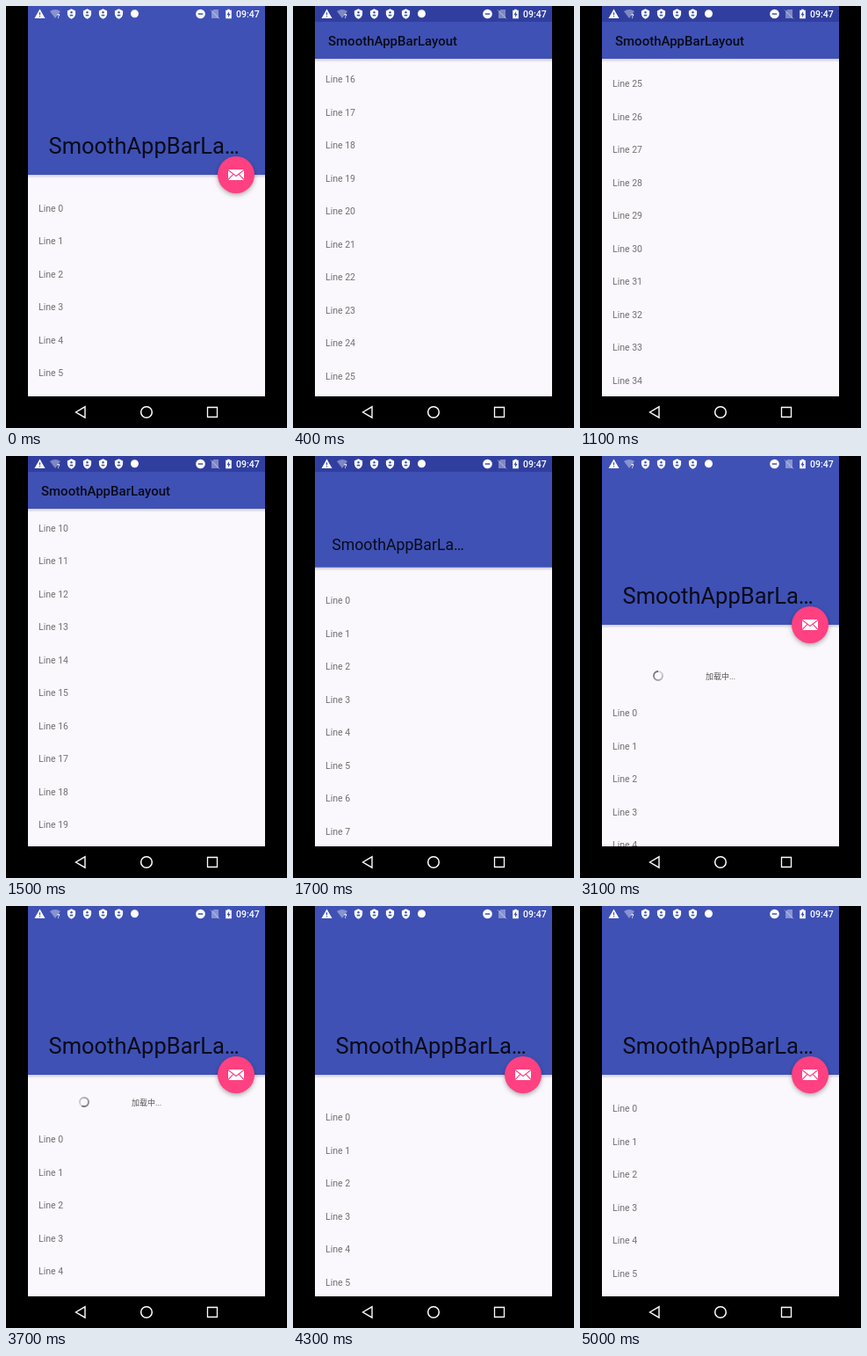
Recreate the animation shown at these times as an HTML page with a canvas. Size 320 px wide and 480 px high, loop 5100 ms.

```html
<!DOCTYPE html>
<html lang="en">
<head>
<meta charset="utf-8">
<title>Collapsing app bar</title>
<style>
  html, body { margin: 0; width: 100%; height: 100%; overflow: hidden; background: #000; }
  canvas { display: block; }
</style>
</head>
<body>
<canvas id="stage" width="320" height="480"></canvas>
<script>
const ctx = document.getElementById('stage').getContext('2d');
const LOOP = 5100, STEP = 100;
const LEFT = 25, WIDTH = 270, BOTTOM = 444;
const BAR_MAX = 192, BAR_MIN = 60, RANGE = BAR_MAX - BAR_MIN;
const ROW = 37.5, LIST_TOP = 211, SCROLL_END = 1079, HEADER = 62.5;
const PRIMARY = '#3f51b5', ACCENT = '#ff4081', PAPER = '#faf8fc';

const lerp = (a, b, k) => a + (b - a) * k;
const progress = (t, start, length) => Math.min(1, Math.max(0, (t - start) / length));
const smooth = k => k * k * (3 - 2 * k);
const easeOut = k => 1 - (1 - k) ** 2;

function rect(x, y, w, h, color) {
  ctx.fillStyle = color;
  ctx.fillRect(x, y, w, h);
}

function disc(x, y, r, color) {
  ctx.fillStyle = color;
  ctx.beginPath();
  ctx.arc(x, y, r, 0, 7);
  ctx.fill();
}

function text(str, x, y, size, color, weight = 400, family = 'Roboto, sans-serif') {
  ctx.font = `${weight} ${size}px ${family}`;
  ctx.fillStyle = color;
  ctx.fillText(str, x, y);
}

function fillPath(d, color) {
  ctx.fillStyle = color;
  ctx.fill(new Path2D(d));
}

function strokePath(d, color, width) {
  ctx.strokeStyle = color;
  ctx.lineWidth = width;
  ctx.stroke(new Path2D(d));
}

function at(x, y, draw) {
  ctx.save();
  ctx.translate(x, y);
  draw();
  ctx.restore();
}

function clipped(x, y, w, h, draw) {
  ctx.save();
  ctx.beginPath();
  ctx.rect(x, y, w, h);
  ctx.clip();
  draw();
  ctx.restore();
}

function scrollAt(t) {
  return SCROLL_END * (smooth(progress(t, 0, 634)) - smooth(progress(t, 1200, 588)));
}

function pullAt(t) {
  return t < 2900 ? 0 : HEADER * (1 - progress(t, 3324, 2180)) ** 3;
}

function drawRefreshHeader(t, pull) {
  const y = LIST_TOP + pull - 23.5;
  clipped(LEFT, LIST_TOP, WIDTH, pull, () => {
    const ring = ctx.createConicGradient((t - 3100) / 1000 * Math.PI * 2 - 1.6, 89, y);
    ring.addColorStop(0, '#dddbdf');
    ring.addColorStop(1, '#6c6b6e');
    ctx.strokeStyle = ring;
    ctx.lineWidth = 2;
    ctx.beginPath();
    ctx.arc(89, y, 5, 0, 7);
    ctx.stroke();
    text('加载中...', 143, y + 3.6, 9, '#555', 400, 'Roboto, "Noto Sans CJK SC", "Noto Sans CJK", sans-serif');
  });
}

function drawList(t, scroll, pull) {
  rect(LEFT, 0, WIDTH, BOTTOM, PAPER);
  if (pull) drawRefreshHeader(t, pull);
  const base = 233.7 - scroll + pull;
  const first = Math.max(0, Math.floor((BAR_MIN - base) / ROW));
  for (let i = first; base + i * ROW < BOTTOM + 12; i++) {
    text('Line ' + i, 37, base + i * ROW, 10.5, '#717072');
  }
}

function drawBar(bottom) {
  const shadow = ctx.createLinearGradient(0, bottom, 0, bottom + 4);
  shadow.addColorStop(0, 'rgba(40,20,60,.2)');
  shadow.addColorStop(1, 'rgba(40,20,60,0)');
  rect(LEFT, bottom, WIDTH, 4, shadow);
  rect(LEFT, 0, WIDTH, bottom, PRIMARY);

  const k = (BAR_MAX - bottom) / RANGE;
  const closed = k === 1;
  text(closed ? 'SmoothAppBarLayout' : 'SmoothAppBarLa…', lerp(48.5, 40, k), lerp(168, 44.5, k),
    lerp(25.5, 15, easeOut(k)), '#090b18', closed ? 500 : 400);
}

function drawFab(y, scale) {
  if (scale <= 0) return;
  at(262, y, () => {
    ctx.scale(scale, scale);
    ctx.shadowColor = 'rgba(0,0,0,.32)';
    ctx.shadowBlur = 5;
    ctx.shadowOffsetY = 2;
    disc(0, 0, 21, ACCENT);
    ctx.shadowColor = 'transparent';
    rect(-9, -6, 18, 12, '#fff');
    strokePath('M-9-5.5L0 1.5 9-5.5M-9 5.5L-3-.8M9 5.5L3-.8', ACCENT, 1.1);
  });
}

function drawStatus(scrim) {
  ctx.globalAlpha = scrim;
  rect(LEFT, 0, WIDTH, 18, '#303f9f');
  ctx.globalAlpha = 1;

  const faint = 'rgba(255,255,255,.38)';
  at(38.5, 9, () => {
    fillPath('M0-5.5L6 5H-6Z', '#fff');
    rect(-.6, -1.8, 1.2, 3.2, PRIMARY);
    rect(-.6, 2.4, 1.2, 1.2, PRIMARY);
  });
  at(56, 9, () => {
    fillPath('M-6-3Q0-7 6-3L0 5Z', faint);
    text('?', 2, 4.5, 7, '#fff', 700);
  });
  for (let i = 0; i < 4; i++) at(74.5 + 18 * i, 9, () => {
    fillPath('M0-5.7L4.6-3.6V0Q4.3 4 0 5.8Q-4.3 4-4.6 0V-3.6Z', '#fff');
    disc(0, -1.7, 1.2, PRIMARY);
    rect(-1.8, .8, 3.6, 1.6, PRIMARY);
  });
  disc(146.5, 8.7, 4.5, '#fff');

  disc(221.5, 9, 5.3, '#fff');
  rect(218.7, 8.3, 5.6, 1.5, PRIMARY);
  at(238, 9, () => {
    fillPath('M-1.5-5H4V5H-4V-2.5Z', faint);
    strokePath('M-5-4.5L5 5.5', 'rgba(255,255,255,.5)', 1);
  });
  at(253.5, 9, () => {
    fillPath('M-1.3-5.3H1.3V-4.2H3.3V5.3H-3.3V-4.2H-1.3Z', '#fff');
    fillPath('M.6-3L-2 1.2H-.4V4L2 0H.6Z', PRIMARY);
  });
  text('09:47', 262, 12.8, 10.5, '#fff', 500);
}

function drawFrame() {
  rect(0, 0, 320, 480, '#000');
  rect(LEFT, BOTTOM - 1, WIDTH, 1, '#fff');
  strokePath('M79.5 462L90 455.8V468.2Z', '#fff', 1.4);
  strokePath('M166.3 462a6.3 6.3 0 1 0-12.6 0a6.3 6.3 0 1 0 12.6 0Z', '#fff', 1.5);
  strokePath('M229.5 456.5h11v11h-11Z', '#fff', 1.3);
}

function render(now) {
  const t = Math.floor(now % LOOP / STEP) * STEP;
  const scroll = scrollAt(t);
  const bar = Math.max(BAR_MIN, BAR_MAX - scroll);
  const scrim = easeOut(progress(t, 50, 450)) - smooth(progress(t, 1700, 750));
  const fab = 1 - smooth(progress(t, 50, 150)) + easeOut(progress(t, 1760, 240));

  drawFrame();
  clipped(LEFT, 0, WIDTH, BOTTOM, () => {
    drawList(t, scroll, pullAt(t));
    drawBar(bar);
    drawFab(bar, fab);
    drawStatus(scrim);
  });
}

function tick() {
  render(performance.now());
  requestAnimationFrame(tick);
}
tick();
</script>
</body>
</html>
```
